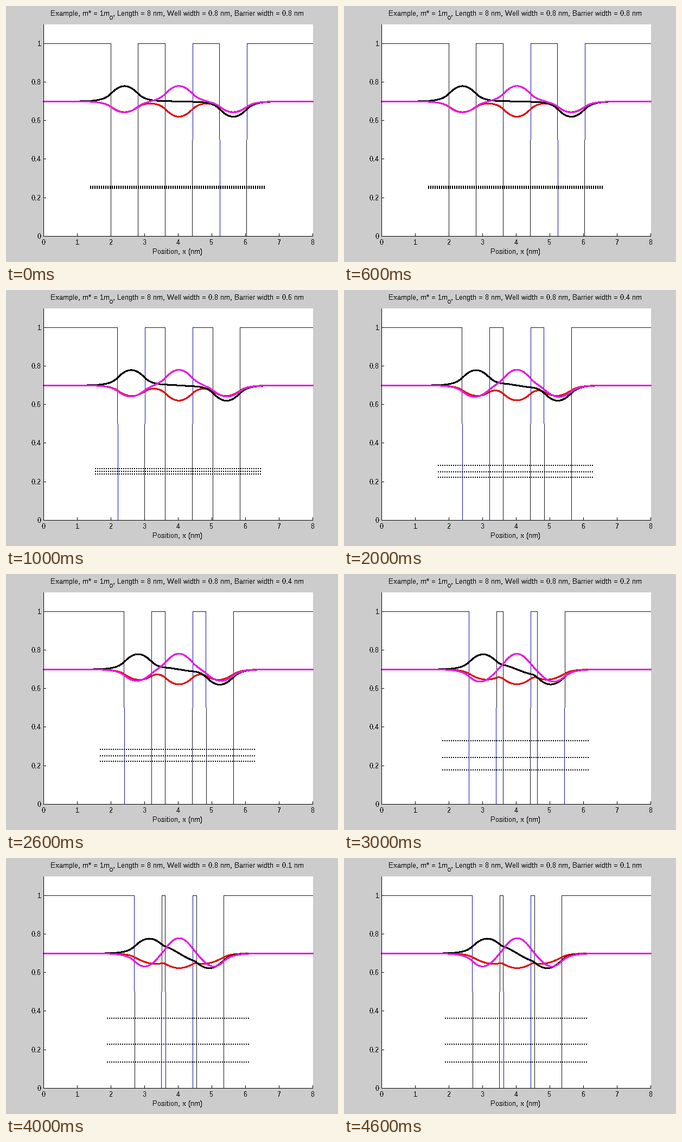
These frames come from a looping animation (612x473 px, 5 s). A matplotlib script:

```python
import math

import matplotlib.pyplot as plt
import numpy as np
from matplotlib.animation import ArtistAnimation
from matplotlib.patches import Rectangle

plt.rcParams.update({
    "font.family": "Liberation Sans",
    "text.antialiased": False,
    "text.hinting": "native",
    "text.hinting_factor": 1,
})

W, H, DPI = 612, 473, 100
PT = 72 / DPI                      # points per pixel
LENGTH, N = 8.0, 1000              # nm, grid points
STEP = LENGTH / (N - 1)
HBAR2_2M = 0.0381                  # eV nm^2
WELL = 0.8
BARRIERS = (0.8, 0.6, 0.4, 0.2, 0.1)
BLACK, DARK, BLUE = "#000000", "#14141c", "#0c0ca4"
STATES = (("#dc1414", -1, N // 2), (BLACK, 1, None), ("#e41ee0", 1, N // 2))

fig = plt.figure(figsize=(W / DPI, H / DPI), dpi=DPI, facecolor="#cccccc")
ax = fig.add_axes((0, 0, 1, 1))
ax.set(xlim=(0, W), ylim=(H, 0))
ax.axis("off")


def px(x):
    return 69.5 + 62 * x


def py(y):
    return 425.2 - 355.6 * y


def box(x, y, w, h, color, z=1):
    return ax.add_patch(Rectangle((x, y), w, h, fc=color, lw=0, aa=False, zorder=z))


def label(x, y, text, ha="left", size=13):
    return ax.text(x, y, text, size=size * PT, ha=ha, va="baseline", zorder=6)


def points(width):
    return int(width * (N / LENGTH) + 0.5)


def wells(barrier):
    """First and last grid index inside each well."""
    first = 250 + points(WELL - barrier)
    span, gap = points(WELL), points(barrier) + 2
    return [(first + i * (span + gap), first + i * (span + gap) + span) for i in range(3)]


def solve(ranges):
    v = np.ones(N)
    for a, b in ranges:
        v[a:b + 1] = 0
    t = HBAR2_2M / STEP ** 2
    off = np.full(N - 1, -t)
    energy, psi = np.linalg.eigh(np.diag(v + 2 * t) + np.diag(off, 1) + np.diag(off, -1))
    return energy[:3], psi[:, :3].T


def column(index):
    return math.floor(px(index * STEP))


def edge(outer, inner):
    """One potential step: upper half at the outer point, lower half at the inner."""
    parts = []
    for index, y, h in ((outer, 69, 178), (inner, 247, 178)):
        x = column(index)
        parts.append(box(x, y, 1, h, DARK if x % 2 else BLUE, 2))
    return parts


def potential(ranges):
    parts, start = [], 0
    for a, b in ranges:
        parts += edge(a - 1, a) + edge(b + 1, b)
        x = column(start)
        parts.append(box(x, 69, column(a - 1) - x + 1, 1, DARK, 2))
        start = b + 1
    x = column(start)
    parts.append(box(x, 69, 566 - x, 1, DARK, 2))
    return parts


def level(energy, left):
    x0 = round(px(0.7 * left * STEP)) - 1
    x1 = round(px(LENGTH - 0.7 * left * STEP)) - 1
    y = round(py(energy)) - 1
    return [box(x, y, 2, 2, BLACK, 3) for x in range(x0, x1, 4)]


def scene(barrier):
    ranges = wells(barrier)
    left = ranges[0][0]
    energies, waves = solve(ranges)
    parts = potential(ranges)
    xs = px(np.arange(N) * STEP)
    for energy, psi, (color, sign, at) in zip(energies, waves, STATES):
        probe = psi[at if at else left + 40]
        psi = psi * sign * np.sign(probe)
        parts += ax.plot(xs, py(0.7 + psi), color=color, lw=2 * PT, aa=False, zorder=4)
        parts += level(energy, left)
    parts.append(label(197, 18, f", Length = 8 nm, Well width = {WELL} nm, "
                                f"Barrier width = {barrier} nm"))
    return parts


# Fixed axes and labels
box(69, 34, 497, 392, "#ffffff", 0)
box(69, 34, 1, 392, BLACK, 5)
box(69, 425, 497, 1, BLACK, 5)
for n in range(9):
    x = math.floor(px(n))
    box(x, 420, 1, 5, BLACK, 5)
    label(x + 0.5, 441, str(n), "center")
for n in range(6):
    y = math.floor(py(n / 5))
    box(69, y, 5, 1, BLACK, 5)
    label(65, y + 5, f"{n / 5:g}", "right")
label(316, 458, "Position, x (nm)", "center")
label(82, 18, "Example, m* = 1m")
label(191, 25, "0", size=10.5)

anim = ArtistAnimation(fig, [scene(b) for b in BARRIERS], interval=1000,
                       repeat=True, repeat_delay=0, blit=False)
plt.show()
```
